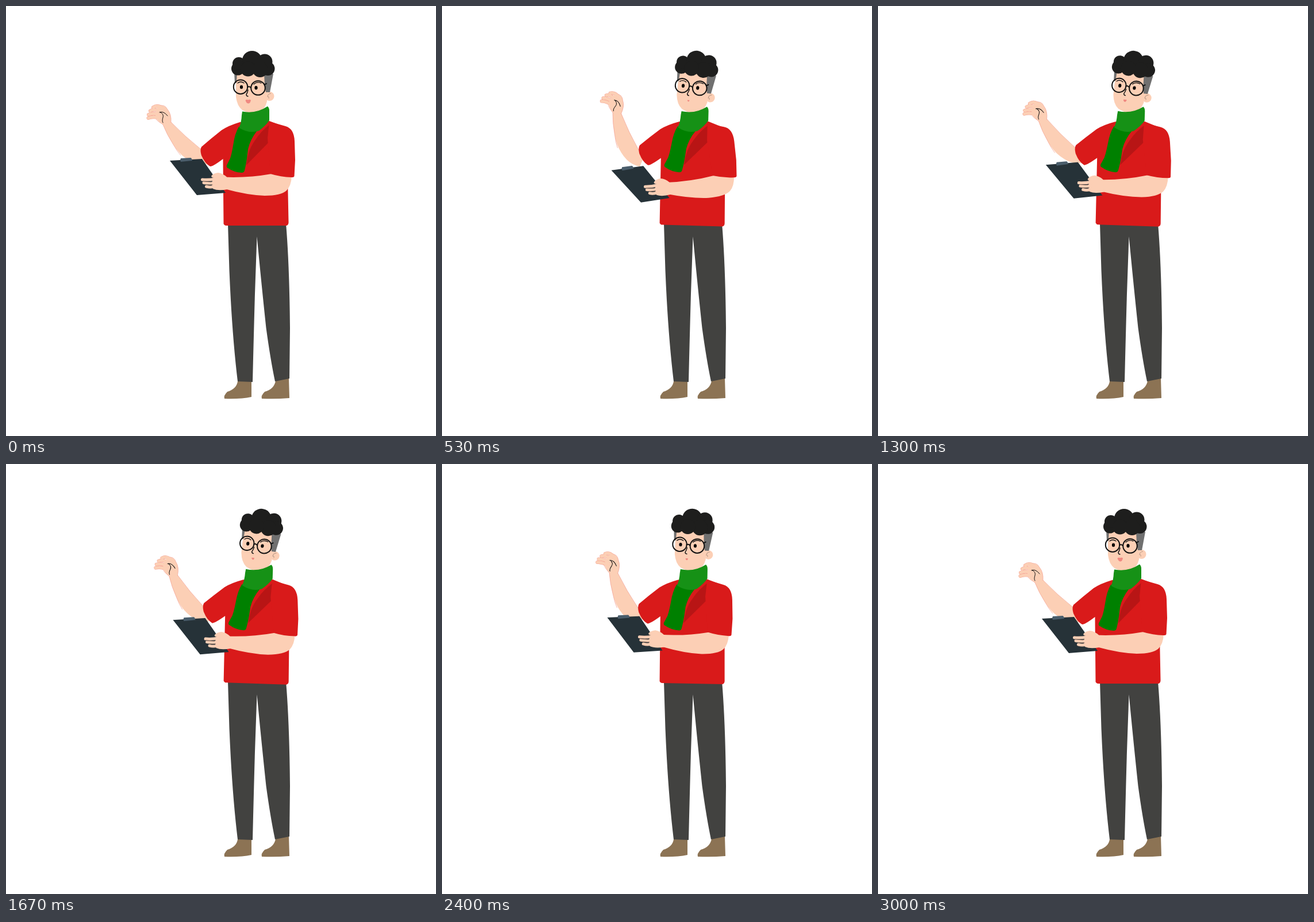
These frames come from a looping animation (748x748 px, 3.03 s). An HTML page:

```html
<!DOCTYPE html>
<html lang="en">
<head>
<meta charset="utf-8">
<title>Presenter with clipboard</title>
<style>
  html, body { margin: 0; width: 100%; height: 100%; overflow: hidden; background: #fff; }
  svg { display: block; width: 100vw; height: 100vh; }
  .skin { fill: #fccfb5; }
  .red { fill: #d91a1a; }
  .hair { fill: #1e1e1d; }
  .grey { fill: #707070; }
  .line { fill: none; stroke: #111; stroke-width: 1.4; stroke-linecap: round; stroke-linejoin: round; }
  .thin { stroke-width: 1; }
  .finger { fill: none; stroke: #fccfb5; stroke-linecap: round; stroke-width: 5; }
  .rim { fill: none; stroke: #f4a193; stroke-width: .7; }
  .finger.edge { stroke: #f4a193; stroke-width: 6; }
</style>
</head>
<body>
<svg viewBox="0 0 748 748">
  <defs>
    <path id="raisedFingers" d="M270 176Q262 172 256 176.500M266 182Q256 179 251 182.500M264 188Q255 186 248 189M264 194Q255 192 247.500 195"/>
  </defs>

  <g id="legs">
    <path fill="#8c7354" d="M403 653L427 652V680Q408 684 380 683Q378 678 385 671Q401 666 403 653Z"/>
    <path fill="#8c7354" d="M469 652L492 647L493 682Q470 684 445 683Q443 678 450 671Q466 667 469 652Z"/>
    <path fill="#424240" d="M386 378L388.500 460Q393 570 403 653L429 654Q431 570 433 500L436.500 401Q445 490 452.500 560Q460 615 468 653L493 648L494 560Q493 450 487 378Z"/>
  </g>

  <g id="torso">
    <g id="farArm">
      <path class="skin" d="M272 204Q280 224 291 241Q303 262 327 273Q340 278 352 275V262L340 250Q311 227 287 202Z"/>
      <path class="rim" d="M272 204Q280 224 291 241Q297 252 304 260M340 250Q311 227 287 202"/>
      <use href="#raisedFingers" class="finger edge"/>
      <path class="skin" d="M273 206Q264 201 260 194Q259 182 265 175Q275 170 281 180Q288 188 287 203Z"/>
      <path class="rim" d="M266 174Q276 170 281 180Q288 188 287 203M273 206Q264 201 261 197"/>
      <use href="#raisedFingers" class="finger"/>
      <path class="line thin" d="M267 185Q274 182 281 191M268 184.500Q275 188 273 194T273 203"/>
    </g>

    <path class="red" d="M407 202Q387 208 375 216Q356 231 340 245Q337 250 340 260Q346 274 355 279Q359 280 377.500 266L378.500 379Q380 382 383 382H488Q492 381 491.500 375L490 300Q487 240 490 212L458 200Z"/>
    <path fill="#b81515" d="M459 206V235L418 277Q420 252 433 234Q444 217 459 206Z"/>

    <g id="head">
      <path class="skin" d="M400 112V158Q402 174 411 181Q427 190 443 183Q451 178 454 166L456 112Z"/>
      <circle class="skin" cx="458.500" cy="157" r="8"/>
      <path fill="none" stroke="#b99a88" d="M461 152Q455 153 455 158Q458 157 457 161"/>
      <path class="grey" d="M449 118H465L459 150H452L450 138ZM397 116H402L401 134H398Z"/>
      <g class="hair">
        <circle cx="403.500" cy="109" r="11.500"/>
        <circle cx="405" cy="100" r="11"/>
        <ellipse cx="428" cy="94" rx="17" ry="16"/>
        <circle cx="450" cy="97" r="13.500"/>
        <circle cx="455.500" cy="109" r="12"/>
        <circle cx="442" cy="110.500" r="13.500"/>
        <circle cx="421" cy="109.500" r="13"/>
      </g>
      <ellipse cx="409.500" cy="141" rx="2.600" ry="3.200"/>
      <ellipse cx="435" cy="142.300" rx="2.600" ry="3.200"/>
      <path class="line" d="M403 134Q408 130 414 134M431 136Q436 131 444 134"/>
      <path class="line" d="M421 146Q420 151 418 154Q418 157 421 157"/>
      <g class="line" style="stroke-width:2">
        <circle cx="408" cy="140.700" r="12.200"/>
        <circle cx="438.500" cy="142.500" r="12.300"/>
        <path d="M420 141Q423 139 426 142M449.500 137L453 135"/>
      </g>
      <path id="mouth" fill="#f08880" d="M416.500 164Q419 162 421 163.500Q423 162 426 163.500Q425 170 421 169.500Q418 169 416.500 164Z"/>
    </g>

    <path fill="#008000" d="M405 210Q398 222 395.500 240Q393 256 390 265L384 277Q383 281 386 282Q396 289 410 290Q414 290 415 286Q419 270 421 249Q425 232 436 218Z"/>
    <path fill="#169116" d="M411 183.500Q435 188 455 174.500Q458 177 458 182V199Q452 208 440 217Q424 223 405.500 212Q409.500 202 410 190Z"/>

    <g id="nearArm">
      <path fill="#263238" d="M285 269L341 266L382 325L332 329Z"/>
      <path fill="#4a5d6b" d="M303 268L304 265L321 264Q323 264 324 269L304 271Z"/>
      <path class="skin" d="M378 297.500Q420 299.500 462 292L497 296Q496 313 488 321Q478 330 450 330Q420 329 380 318Z"/>
      <path class="skin" d="M384 297.500Q377 291 369 290Q360 291 357 296Q358 299 362 299Q355 307 360 318Q369 322 385 319Z"/>
      <path class="finger" d="M364 301Q352 303 341.500 302M362 308Q352 309 344 307.500M362 314Q355 316 348.500 314"/>
      <path class="line" style="stroke:#5b4a43;stroke-width:.8" d="M343 305L357 306M347 311L359 311"/>
      <path class="red" d="M458 201L486 209Q501 213 502 235L503 268L501.500 296Q501 298.500 497 298Q478 297.500 460 292L455 230Z"/>
    </g>
  </g>
</svg>
<script>
const LOOP = 3030;

// Each key is [time in ms, value].
const lean = [[0, 0], [530, .9], [800, 1], [1640, 1], [2130, .83], [2670, .35], [3000, 0], [LOOP, 0]];
const nod = [[0, 0], [530, .87], [800, 1], [1640, 1], [2130, .5], [2670, .05], [3000, 0], [LOOP, 0]];
const wave = [[0, 0], [550, 20.7], [970, 7.3], [1070, 4.4], [1270, 1], [1670, 6.5],
              [2130, 14.8], [2400, 16.5], [2670, 13], [3000, 0], [LOOP, 0]];
const lift = [[0, 0], [560, -6.1], [970, -4.7], [1670, -2], [2130, -.5], [2670, -.1], [3000, 0], [LOOP, 0]];

const slope = (a, b) => (b[1] - a[1]) / (b[0] - a[0]);

function tangent(keys, i) {
  if (i === 0 || i === keys.length - 1) return 0;
  const before = slope(keys[i - 1], keys[i]);
  const after = slope(keys[i], keys[i + 1]);
  return before * after <= 0 ? 0 : 2 * before * after / (before + after);
}

// Smooth curve through the keys that never overshoots them.
function valueAt(keys, time) {
  const i = Math.max(0, keys.findIndex(key => key[0] > time) - 1);
  const [t0, v0] = keys[i], [t1, v1] = keys[i + 1];
  const span = t1 - t0, u = (time - t0) / span;
  const ease = u * u * (3 - 2 * u);
  return v0 + (v1 - v0) * ease
    + span * u * (1 - u) * (tangent(keys, i) * (1 - u) - tangent(keys, i + 1) * u);
}

const part = id => document.getElementById(id);
const torso = part('torso'), head = part('head'), mouth = part('mouth');
const farArm = part('farArm'), nearArm = part('nearArm');

function turn(element, angle, x, y) {
  element.setAttribute('transform', `rotate(${angle.toFixed(3)} ${x} ${y})`);
}

function draw(time) {
  turn(torso, 1.8 * valueAt(lean, time), 435, 382);
  turn(head, 4.6 * valueAt(nod, time), 436, 185);
  turn(farArm, valueAt(wave, time), 328, 249);
  turn(nearArm, valueAt(lift, time), 484, 214);
  const open = .7 + .3 * Math.cos(time / LOOP * 6 * Math.PI);
  mouth.setAttribute('transform', `translate(421 166) scale(${open.toFixed(3)}) translate(-421 -166)`);
}

const start = performance.now();
function tick(now) {
  draw(Math.max(0, now - start) % LOOP);
  requestAnimationFrame(tick);
}
draw(0);
requestAnimationFrame(tick);
</script>
</body>
</html>
```
